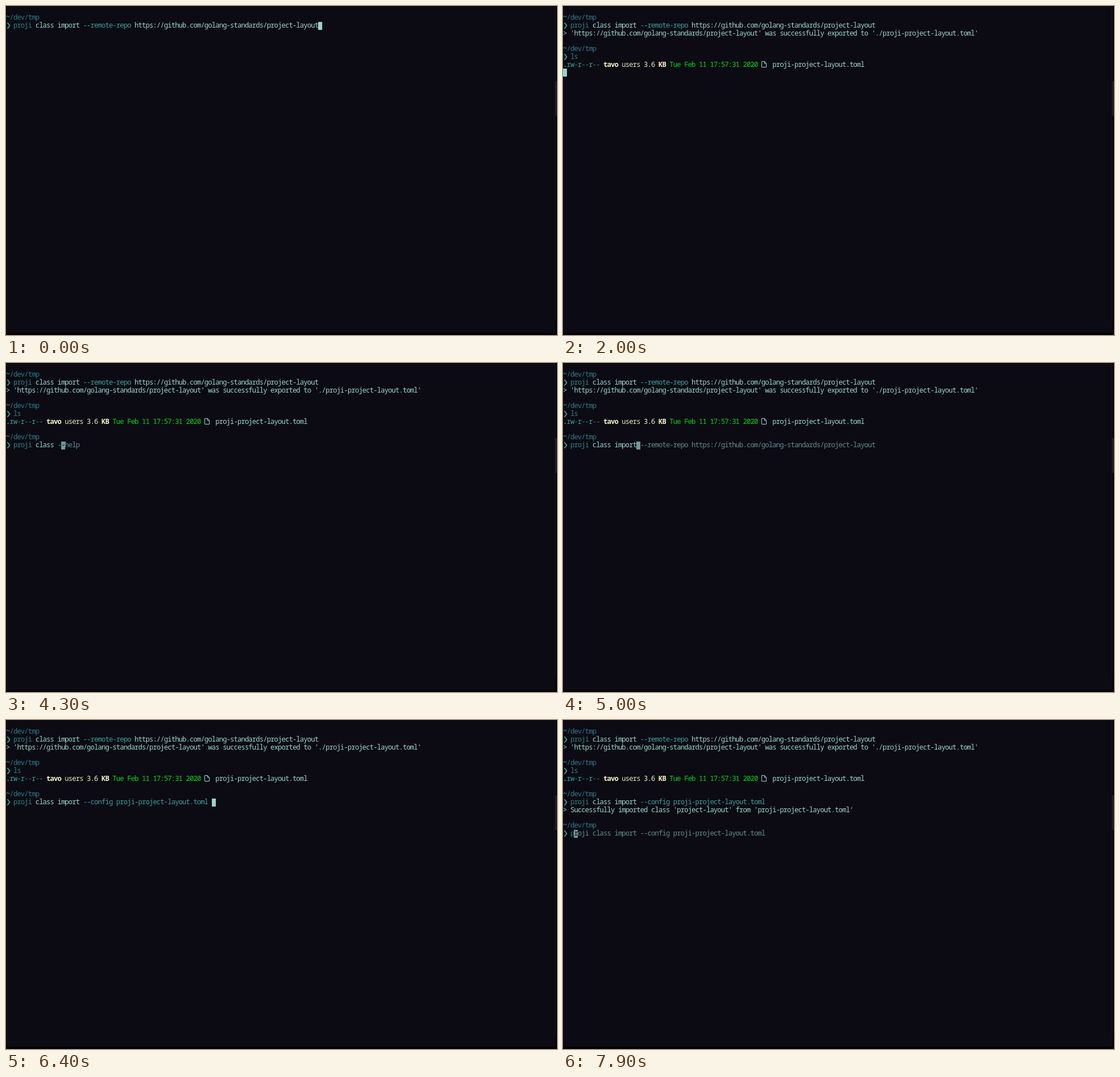
Animation of 969 by 578 pixels, one loop 8 s. Source, as an HTML page with a canvas:

```html
<!DOCTYPE html>
<html lang="en">
<head>
<meta charset="utf-8">
<title>Terminal</title>
<style>
  html, body { margin: 0; width: 100%; height: 100%; overflow: hidden; background: #0c0b13; }
  canvas { display: block; }
</style>
</head>
<body>
<canvas id="screen" width="969" height="578"></canvas>
<script>
const ctx = document.getElementById('screen').getContext('2d');
const LOOP = 8000, CELL = 6.46, ROW = 13.75;
const FONT = 'semi-condensed 12.2px "Noto Sans Mono", "DejaVu Sans Mono", monospace';
const C = {
  bg: '#0c0b13', path: '#2c7a8c', prompt: '#3ba3a1', command: '#2f7f83',
  text: '#9ad6d0', option: '#3a9f9c', hint: '#5c8f8f', cursor: '#9ad3cc',
  green: '#08d812', cream: '#f8f6cc', pale: '#e5e9c0', mark: '#3f7a7c'
};

const REPO = 'https://github.com/golang-standards/project-layout';
const FILE = 'proji-project-layout.toml';
const IMPORT_REPO = 'proji class import --remote-repo ' + REPO;
const IMPORT_FILE = 'proji class import --config ' + FILE;
const HELP = 'proji class --help';

// Draws [string, colour, bold] runs on the character grid.
function write(row, col, runs) {
  for (const [str, color, bold] of runs) {
    ctx.font = (bold ? '600 ' : '500 ') + FONT;
    ctx.letterSpacing = '0px';
    ctx.letterSpacing = CELL - ctx.measureText('0').width + 'px';
    ctx.fillStyle = color;
    ctx.fillText(str, col * CELL, row * ROW + 10.5);
    col += str.length;
  }
}

function cursor(row, col, color = C.cursor) {
  ctx.fillStyle = color;
  ctx.fillRect(Math.round(col * CELL), Math.round(row * ROW), 7, 14);
}

function prompt(row) {
  write(row, 0, [['~', C.prompt], ['/dev/tmp', C.path]]);
  const y = (row + 1) * ROW;
  ctx.strokeStyle = C.prompt;
  ctx.lineWidth = 1.8;
  ctx.beginPath();
  ctx.moveTo(2.5, y + 1.8);
  ctx.lineTo(6.5, y + 7);
  ctx.lineTo(2.5, y + 12.2);
  ctx.stroke();
}

function wordColor(word, index) {
  if (index === 0) return C.command;
  return word.startsWith('-') || word === FILE ? C.option : C.text;
}

function commandLine(row, typed, hint = '', active = false) {
  let col = 2;
  typed.split(' ').forEach((word, i) => {
    write(row, col, [[word, wordColor(word, i)]]);
    col += word.length + 1;
  });
  const end = 2 + typed.length;
  const rest = hint.startsWith(typed) ? hint.slice(typed.length) : '';
  write(row, end, [[rest, C.hint]]);
  if (!active) return;
  cursor(row, end, rest ? '#6a9a99' : C.cursor);
  if (rest) write(row, end, [[rest[0], C.bg]]);
}

function fileIcon(row) {
  const x = 349.5, y = Math.round(row * ROW) + 1.5;
  ctx.strokeStyle = C.text;
  ctx.lineWidth = 1;
  ctx.beginPath();
  ctx.moveTo(x + 5, y);
  ctx.lineTo(x, y);
  ctx.lineTo(x, y + 10);
  ctx.lineTo(x + 8, y + 10);
  ctx.lineTo(x + 8, y + 3.5);
  ctx.lineTo(x + 5, y);
  ctx.lineTo(x + 5, y + 3.5);
  ctx.lineTo(x + 8, y + 3.5);
  ctx.stroke();
}

function listing(row) {
  write(row, 0, [
    ['.', C.text], ['rw', C.option], ['-', C.mark], ['r', C.option],
    ['--', C.mark], ['r', C.option], ['--', C.mark], [' tavo', C.cream, true],
    [' users', C.pale], [' 3.6', C.cream], [' KB', C.cream, true],
    [' Tue Feb 11 17:57:31 2020', C.green]
  ]);
  fileIcon(row);
  write(row, 57, [[FILE, C.text]]);
}

// Number of keys pressed by time t.
const keys = (t, start, gap) => Math.max(0, Math.floor((t - start) / gap) + 1);

// Contents of the third command line: [typed, suggestion].
function thirdCommand(t) {
  if (t >= 6100) return [IMPORT_FILE + ' ', ''];
  if (t >= 4600) {
    const typed = IMPORT_FILE.slice(0, 12 + Math.min(16, keys(t, 4600, 70)));
    return [typed, typed.length > 21 ? IMPORT_FILE : IMPORT_REPO];
  }
  if (t >= 4500) return ['proji class ', IMPORT_REPO];
  const typed = HELP.slice(0, Math.min(13, keys(t, 2900, 115)));
  return [typed, typed === '' ? '' : typed.length > 12 ? HELP : IMPORT_REPO];
}

function windowFrame() {
  ctx.fillStyle = C.bg;
  ctx.fillRect(0, 0, 969, 578);
  ctx.fillStyle = '#040408';
  ctx.fillRect(0, 574, 969, 4);
  ctx.fillRect(966, 0, 3, 578);
  ctx.fillStyle = '#1b1a21';
  ctx.fillRect(965, 0, 1, 552);
  ctx.fillStyle = '#1c1b21';
  ctx.fillRect(966, 132, 3, 61);
}

function draw(t) {
  windowFrame();
  prompt(1);
  commandLine(2, IMPORT_REPO, '', t < 300);
  if (t < 300) return;
  if (t < 800) return cursor(3, 0);

  write(3, 0, [[`> '${REPO}' was successfully exported to './${FILE}'`, C.text]]);
  prompt(5);
  commandLine(6, 'ls'.slice(0, keys(t, 1500, 150)), '', t < 1900);
  if (t < 1900) return;

  listing(7);
  if (t < 2100) return cursor(8, 0);
  prompt(9);
  commandLine(10, ...thirdCommand(t), t < 6800);
  if (t < 6800) return;
  if (t < 7000) return cursor(11, 0);

  write(11, 0, [[`> Successfully imported class 'project-layout' from '${FILE}'`, C.text]]);
  prompt(13);
  const typed = t < 7800 ? '' : 'p';
  commandLine(14, typed, typed && IMPORT_FILE, true);
}

function tick() {
  draw(performance.now() % LOOP);
  requestAnimationFrame(tick);
}
tick();
</script>
</body>
</html>
```
